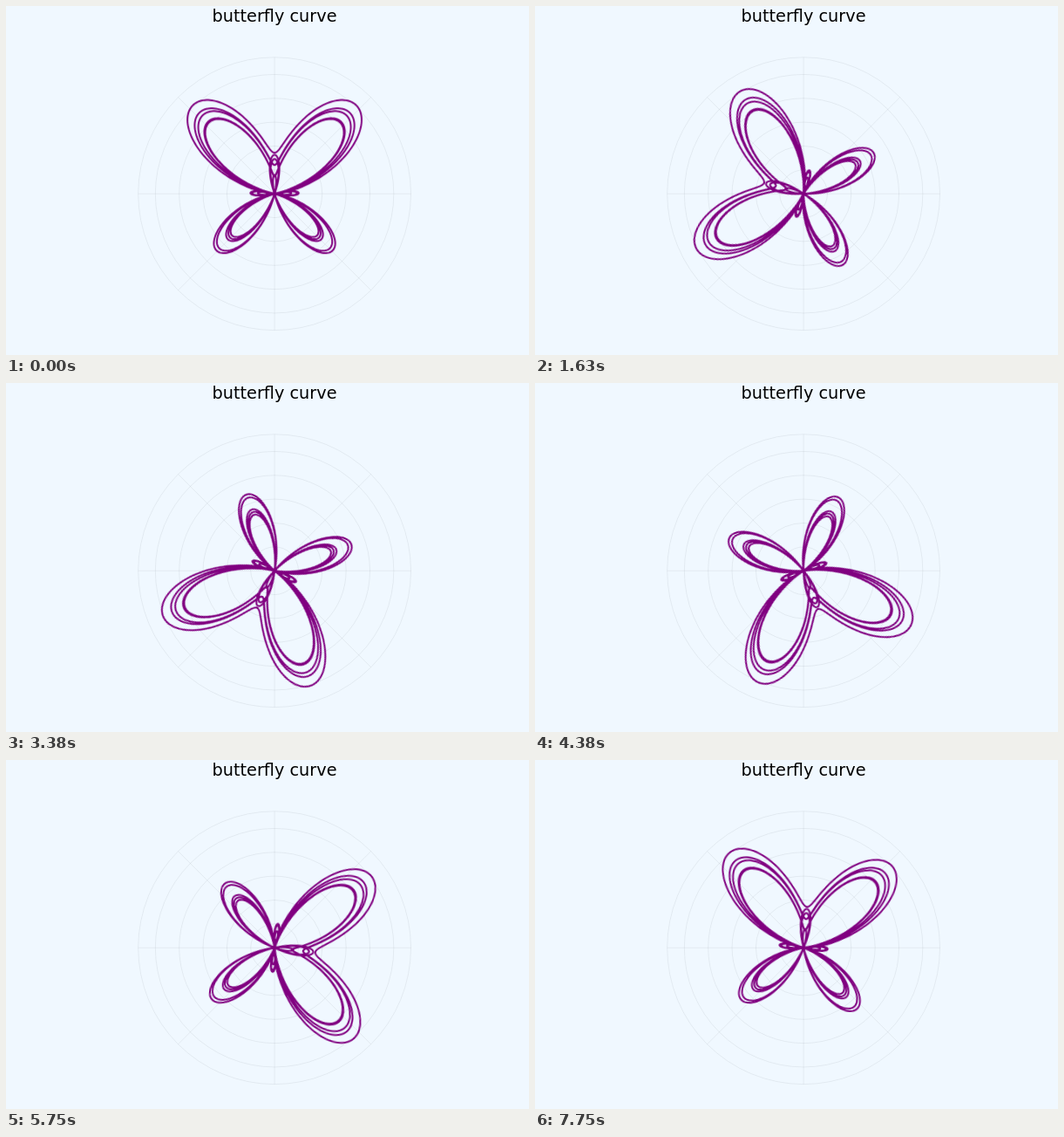
These frames come from a looping animation (600 px wide and 400 px high, 7870 ms). An HTML page:

```html
<!DOCTYPE html>
<html lang="en">
<head>
<meta charset="utf-8">
<title>butterfly curve</title>
<style>
  html, body { margin: 0; width: 100%; height: 100%; overflow: hidden; background: #f0f8ff; }
  svg { display: block; width: 100%; height: 100%; }
  text { font: 19.3px "DejaVu Sans", sans-serif; text-anchor: middle; }
  #grid { fill: none; stroke: #000; stroke-opacity: .06; }
  #curve {
    fill: none; stroke: #800080; stroke-width: 2; stroke-linejoin: round;
    animation: turn 7870ms steps(63) infinite;
  }
  @keyframes turn { to { transform: rotate(-6.3rad); } }
</style>
</head>
<body>
<svg viewBox="0 0 600 400">
  <text x="308" y="18">butterfly curve</text>
  <g transform="translate(308.1 215.2)">
    <path id="grid"/>
    <path id="curve"/>
  </g>
</svg>
<script>
  const UNIT = 27.35, RIM = 156.4, SAMPLES = 3000;
  const { PI, sin, cos, exp } = Math;

  const point = (r, a) => `${(r * cos(a)).toFixed(2)} ${(-r * sin(a)).toFixed(2)}`;
  const ring = r => `M${-r} 0a${r} ${r} 0 1 1 ${2 * r} 0a${r} ${r} 0 1 1 ${-2 * r} 0`;
  const setPath = (id, d) => document.getElementById(id).setAttribute('d', d);

  let grid = ring(RIM);
  for (let i = 1; i <= 5; i++) grid += ring(i * UNIT);
  for (let i = 0; i < 8; i++) grid += `M0 0L${point(RIM, i * PI / 4)}`;
  setPath('grid', grid);

  const radius = a => exp(sin(a)) - 2 * cos(4 * a) + sin((2 * a - PI) / 24) ** 5;
  const pts = Array.from({ length: SAMPLES + 1 }, (_, i) => {
    const a = 12 * PI * i / SAMPLES;
    return point(UNIT * radius(a), a);
  });
  setPath('curve', 'M' + pts.join('L'));
</script>
</body>
</html>
```
